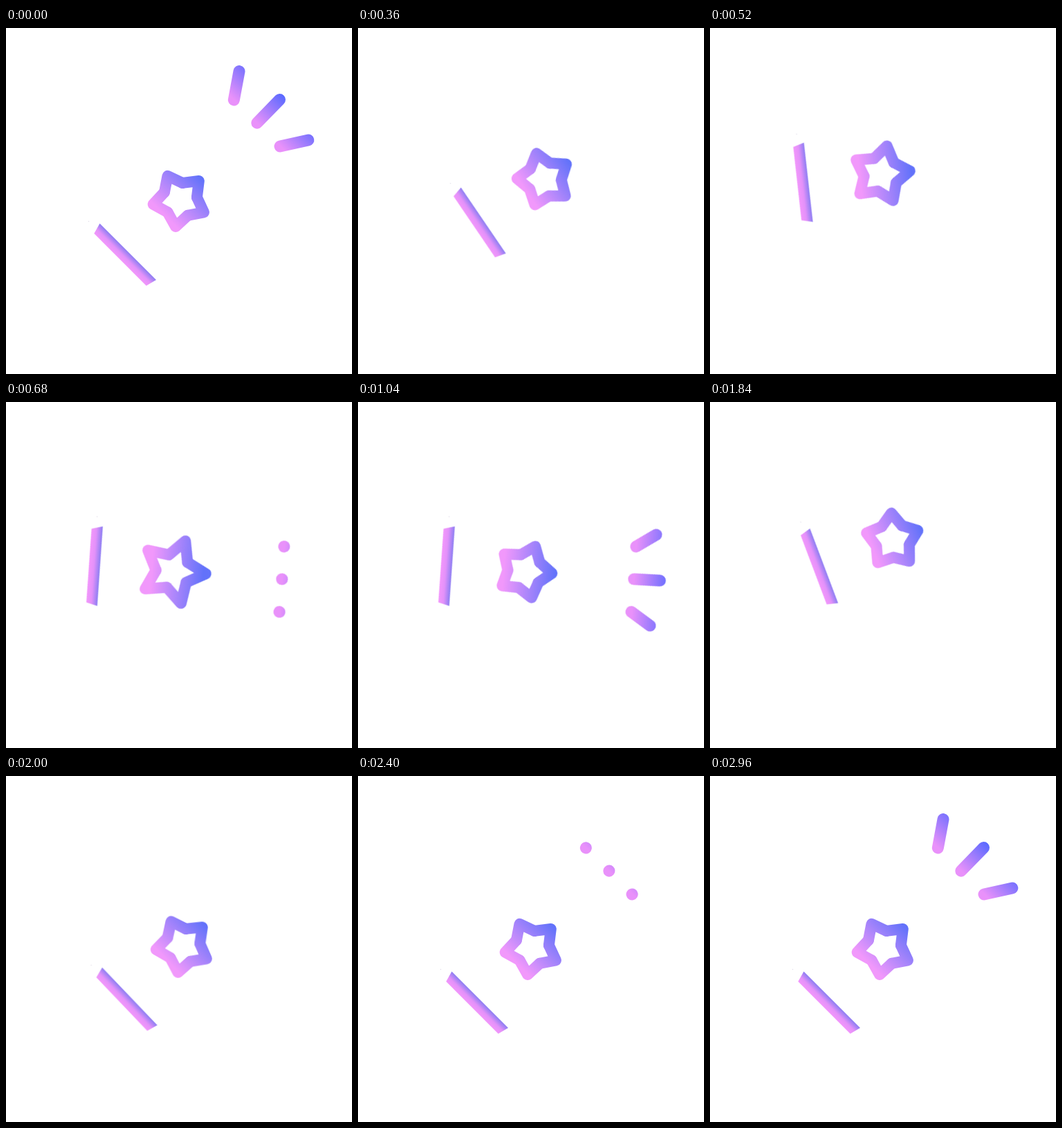
An HTML page without scripts for the animation above (3 s loop, 500 by 500 pixels).

```html
<!DOCTYPE html>
<html lang="en">
<head>
<meta charset="utf-8">
<title>Star wand</title>
<style>
  html, body { margin: 0; width: 100%; height: 100%; overflow: hidden; background: #fff; }
  svg { display: block; width: 100%; height: 100%; }

  .hop, .turn, .arm, .rays { animation: 3s cubic-bezier(.333, 0, .667, 1) infinite; }

  /* up one side of a small loop, down the other */
  .hop {
    animation-name: hop;
    transform-origin: 0 0;
    offset-path: path("M0 0C14 -7 27 -37 18.2 -48.2C6 -50 -6 -15 0 0");
    offset-rotate: 0deg;
  }
  @keyframes hop {
    0%, 8% { offset-distance: 0%; }
    14.667%, 61.333% { offset-distance: 50%; }
    21.333%, 54.667% { offset-distance: 100%; }
    68%, 100% { offset-distance: 0%; }
  }

  .turn { animation-name: turn; transform-origin: 250.4px 236px; }
  @keyframes turn {
    0%, 8%, 68%, 100% { transform: rotate(0deg); }
    21.333%, 54.667% { transform: rotate(49deg); }
  }

  .arm {
    animation-name: stretch;
    fill: none; stroke: #fff; stroke-width: 16; stroke-linecap: round; stroke-linejoin: round;
  }
  @keyframes stretch {
    0%, 14.667%, 29.333%, 100% { d: path("M20.2 -14.7L39 0L20.2 14.7"); }
    22% { d: path("M20 -14.5L47.7 0L20 14.5"); }
  }

  /* each half period of the dash either grows a ray or retracts it outwards */
  .rays {
    animation-name: flash;
    fill: none; stroke: url(#rayFill); stroke-width: 17; stroke-linecap: round;
    stroke-dasharray: 1 1.02;
  }
  @keyframes flash {
    0% { stroke-dashoffset: 0; }
    10.667%, 21.333% { stroke-dashoffset: -1.01; }
    40% { stroke-dashoffset: -2.02; }
    52%, 78.667% { stroke-dashoffset: -3.03; }
    98.667%, 100% { stroke-dashoffset: -4.04; }
  }
</style>
</head>
<body>
<svg viewBox="0 0 500 500">
  <defs>
    <linearGradient id="barFill" gradientUnits="userSpaceOnUse" x1="165" y1="334" x2="175.5" y2="323.5">
      <stop offset="0" stop-color="#f196fb"/>
      <stop offset=".45" stop-color="#e391f9"/>
      <stop offset="1" stop-color="#937ff3"/>
    </linearGradient>
    <linearGradient id="starFill" gradientUnits="userSpaceOnUse" x1="-31" y1="0" x2="44" y2="0">
      <stop offset="0" stop-color="#f198fb"/>
      <stop offset="1" stop-color="#6272fa"/>
    </linearGradient>
    <linearGradient id="rayFill" gradientUnits="userSpaceOnUse" x1="363" y1="137" x2="402.8" y2="97.2">
      <stop offset="0" stop-color="#e991fa"/>
      <stop offset="1" stop-color="#5568ff"/>
    </linearGradient>
    <mask id="star" maskUnits="userSpaceOnUse" x="-60" y="-60" width="120" height="120">
      <path class="arm" d="M20.2 -14.7L39 0L20.2 14.7"/>
      <path class="arm" d="M20.2 -14.7L39 0L20.2 14.7" transform="rotate(72)"/>
      <path class="arm" d="M20.2 -14.7L39 0L20.2 14.7" transform="rotate(144)"/>
      <path class="arm" d="M20.2 -14.7L39 0L20.2 14.7" transform="rotate(216)"/>
      <path class="arm" d="M20.2 -14.7L39 0L20.2 14.7" transform="rotate(288)"/>
    </mask>
  </defs>

  <g class="hop">
    <g class="turn">
      <circle cx="119.5" cy="279.5" r=".8" fill="#e4e0ea"/>
      <path d="M135.5 282.5L127.3 297L202.7 372.5L217 364Z" fill="url(#barFill)"/>
      <g transform="translate(251.2 248.6) rotate(-45)">
        <rect x="-60" y="-60" width="120" height="120" fill="url(#starFill)" mask="url(#star)"/>
      </g>
      <g class="rays">
        <path pathLength="1" d="M329.3 104L337 62.5"/>
        <path pathLength="1" d="M362.8 137.2L395.5 103.5"/>
        <path pathLength="1" d="M396 171L436.8 162"/>
      </g>
    </g>
  </g>
</svg>
</body>
</html>
```
